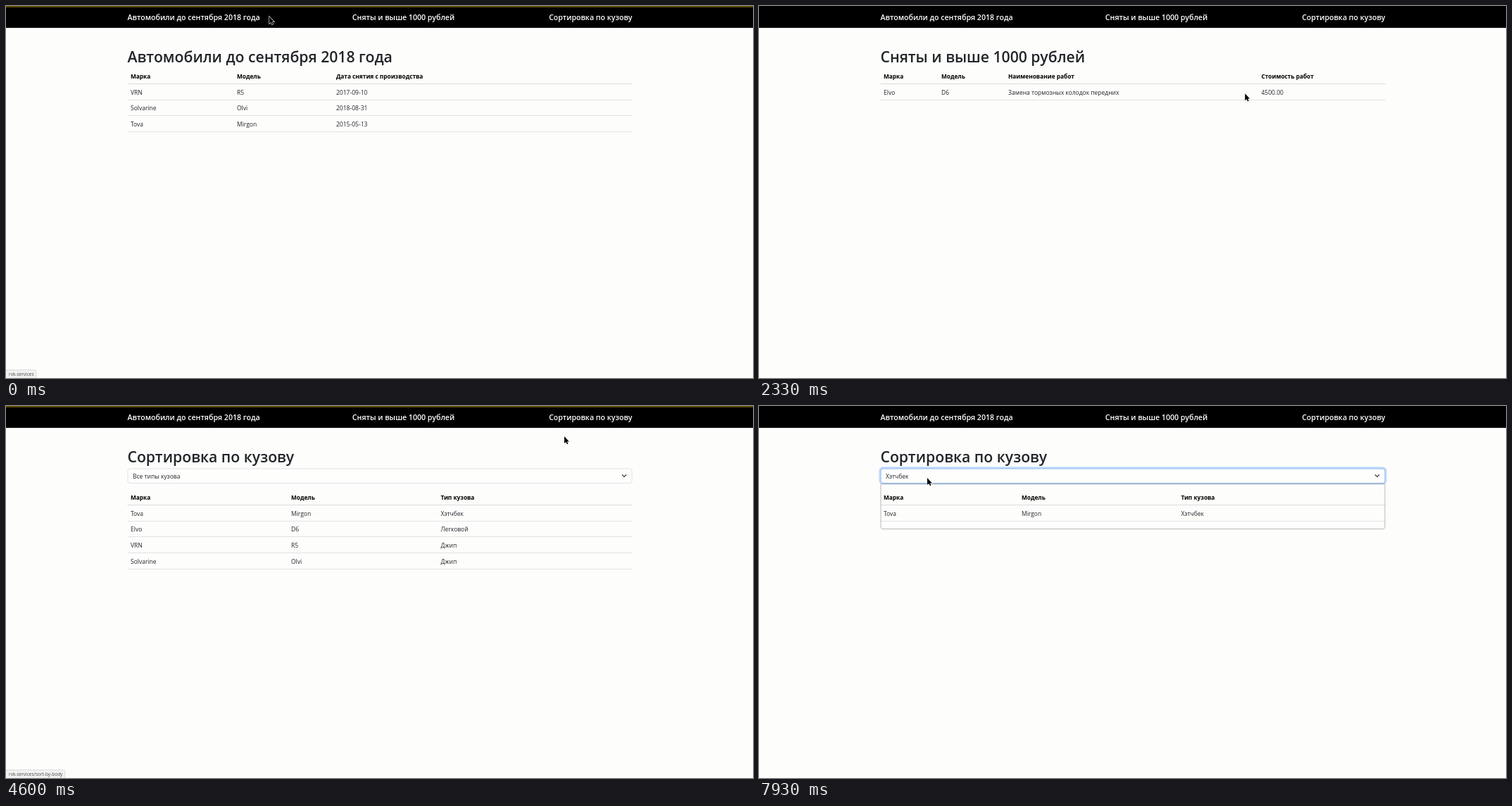
These frames come from a looping animation (1061 px wide and 528 px high, 8000 ms). An HTML page with a canvas:

```html
<!DOCTYPE html>
<html lang="ru">
<head>
<meta charset="utf-8">
<style>
  html, body { margin: 0; width: 100%; height: 100%; overflow: hidden; background: #fdfdfb; }
  canvas { display: block; }
</style>
</head>
<body>
<canvas id="stage" width="1061" height="528"></canvas>
<script>
const LOOP = 8000, LEFT = 172.5, RIGHT = 889.5, ROW = 22.7;
const BG = '#fdfdfb', INK = '#212529', BLUE = '#1b66c9';
const FONT = '"Open Sans", "Noto Sans", sans-serif';
const ctx = document.getElementById('stage').getContext('2d');

const LINKS = [
  ['Автомобили до сентября 2018 года', 172.5, 356],
  ['Сняты и выше 1000 рублей', 494, 635],
  ['Сортировка по кузову', 773, 889.5],
];
const TYPES = ['Все типы кузова', 'Хэтчбек', 'Легковой', 'Джип'];
const SITE = 'rvk-services';

const byDate = {
  title: LINKS[0][0], top: 103, cols: [177, 328, 469],
  rows: [
    ['Марка', 'Модель', 'Дата снятия с производства'],
    ['VRN', 'R5', '2017-09-10'],
    ['Solvarine', 'Olvi', '2018-08-31'],
    ['Tova', 'Mirgon', '2015-05-13'],
  ],
};
const byPrice = {
  title: LINKS[1][0], top: 103, cols: [177, 259, 354, 713.5],
  rows: [
    ['Марка', 'Модель', 'Наименование работ', 'Стоимость работ'],
    ['Elvo', 'D6', 'Замена тормозных колодок передних', '4500.00'],
  ],
};
const byBody = {
  title: LINKS[2][0], top: 133, cols: [177, 405, 617.5], select: TYPES[0],
  rows: [
    ['Марка', 'Модель', 'Тип кузова'],
    ['Tova', 'Mirgon', 'Хэтчбек'],
    ['Elvo', 'D6', 'Легковой'],
    ['VRN', 'R5', 'Джип'],
    ['Solvarine', 'Olvi', 'Джип'],
  ],
};
const hatchbacks = {
  ...byBody, cols: [177, 373, 599.5], select: TYPES[1], rows: byBody.rows.slice(0, 2),
};

// Pointer stops: time, x, y
const PATH = [
  [0, 374, 15], [60, 374, 15], [600, 560, 16], [850, 560, 16], [1440, 377, 127],
  [1700, 377, 127], [2450, 713, 124], [2600, 713, 124], [3000, 788, 124],
  [3370, 788, 124], [4000, 815, 16], [4250, 815, 16], [4600, 793, 43],
  [5080, 239, 102], [5450, 239, 102], [5800, 228, 132], [6200, 228, 132],
  [6700, 239, 102], [LOOP, 239, 102],
];

const during = (t, from, to) => t >= from && t < to;

function pointerAt(t) {
  const i = PATH.findIndex(stop => stop[0] > t);
  const [t0, x0, y0] = PATH[i - 1], [t1, x1, y1] = PATH[i];
  const p = (t - t0) / (t1 - t0), k = p * p * (3 - 2 * p);
  return [x0 + (x1 - x0) * k, y0 + (y1 - y0) * k];
}

function text(str, x, y, size, weight = 400, color = INK, align = 'left') {
  ctx.font = `${weight} ${size}px ${FONT}`;
  ctx.textAlign = align;
  ctx.fillStyle = color;
  ctx.fillText(str, x, y);
}

function rect(x, y, w, h, color) {
  ctx.fillStyle = color;
  ctx.fillRect(x, y, w, h);
}

function box(x, y, w, h, r, stroke, fill, width = 1) {
  ctx.beginPath();
  ctx.roundRect(x, y, w, h, r);
  if (fill) { ctx.fillStyle = fill; ctx.fill(); }
  ctx.strokeStyle = stroke;
  ctx.lineWidth = width;
  ctx.stroke();
}

function drawNav(loading) {
  rect(0, 0, 1061, 31, '#000');
  if (loading) rect(0, 0, 1061, 2, '#5c4b00');
  text(LINKS[0][0], LEFT, 20, 10.6, 600, '#fff');
  text(LINKS[1][0], 564.5, 20, 10.6, 600, '#fff', 'center');
  text(LINKS[2][0], RIGHT, 20, 10.6, 600, '#fff', 'right');
}

function drawTable({ top, cols, rows }) {
  rows.forEach((row, r) => {
    const y = top + r * ROW;
    row.forEach((cell, c) =>
      text(cell, cols[c], y, r ? 8.5 : 8.3, r ? 400 : 700, r ? INK : '#000'));
    rect(LEFT, Math.round(y + 7), RIGHT - LEFT, 1, r ? '#e2e3e7' : '#d9dbdf');
  });
}

function drawSelect(label, focused) {
  if (focused) box(172, 88, 718, 22, 4, '#c4dbfb', null, 3.4);
  box(173, 89, 716, 20.5, 3, focused ? '#8fb9f5' : '#dee2e6', '#fefefd');
  text(label, 180, 102.5, 8.5);
  ctx.beginPath();
  ctx.moveTo(875, 97.5);
  ctx.lineTo(878, 100.5);
  ctx.lineTo(881, 97.5);
  ctx.strokeStyle = '#343a40';
  ctx.lineWidth = 1.2;
  ctx.stroke();
}

function drawOptions(hover) {
  box(173, 110.5, 716, 64, [0, 0, 3, 3], '#b9bab8', '#fefefd');
  rect(173.5, 110 + hover * 16, 715, 16, BLUE);
  TYPES.forEach((type, i) =>
    text(type, 180, 122 + i * 16, 8.5, 400, i === hover ? '#fff' : INK));
}

function drawStatus(url) {
  ctx.font = `400 6.5px ${FONT}`;
  const w = ctx.measureText(url).width + 8;
  box(-2, 516.5, w + 1.5, 14, [0, 2, 0, 0], '#dcdddc', '#f0f1f0');
  text(url, 4, 525, 6.5, 400, '#4a4d50');
}

const SHAPES = {
  arrow: new Path2D('M0 0V10L2.3 8L3.9 11.2L5.4 10.4L3.9 7.4H6.8Z'),
  hand: new Path2D('M0 0Q1 -1 2 0V4L6 5Q7 5.3 7 6.5L6 11H1L-2 7Q-2 5.5 0 6.5Z'),
  beam: new Path2D('M-2 -4H-.6L0 -3.4L.6 -4H2M0 -3.4V3.4M-2 4H-.6L0 3.4L.6 4H2'),
};

function drawPointer(x, y, page) {
  const onLink = y < 24 && LINKS.some(([, a, b]) => x > a && x < b);
  const onText = page === byPrice && y > 116 && y < 130 &&
    (during(x, 354, 509) || during(x, 712, 745));
  ctx.save();
  ctx.translate(x, y);
  if (onText) {
    ctx.strokeStyle = '#222';
    ctx.lineWidth = 0.9;
    ctx.stroke(SHAPES.beam);
  } else {
    const shape = onLink ? SHAPES.hand : SHAPES.arrow;
    ctx.strokeStyle = '#fff';
    ctx.lineWidth = 1.2;
    ctx.stroke(shape);
    ctx.fillStyle = onLink ? '#fff' : '#000';
    ctx.fill(shape);
    if (onLink) {
      ctx.strokeStyle = '#000';
      ctx.lineWidth = 0.6;
      ctx.stroke(shape);
    }
  }
  ctx.restore();
}

function pageAt(t) {
  if (t < 870) return byDate;
  if (t < 4280) return byPrice;
  return t < 5920 ? byBody : hatchbacks;
}

function statusAt(t) {
  if (t < 250) return SITE;
  if (during(t, 480, 1580)) return SITE + '/cars-above-1000';
  if (during(t, 3960, 5060)) return SITE + '/sort-by-body';
}

function draw(t) {
  const page = pageAt(t), [x, y] = pointerAt(t), url = statusAt(t);
  rect(0, 0, 1061, 528, BG);
  drawNav(t < 500 || during(t, 830, 1350) || during(t, 4230, 5060));
  text(page.title, LEFT, 80, 21.2, 600);
  drawTable(page);
  if (page.select) drawSelect(page.select, t >= 5370);

  if (during(t, 2600, 4280)) {
    const w = Math.max(0, Math.min(x - 713.5, 30.5));
    ctx.save();
    ctx.beginPath();
    ctx.rect(713.5, 116, w, 13);
    ctx.clip();
    rect(713, 116, 32, 13, '#2f65c4');
    text('4500.00', 713.5, 103 + ROW, 8.5, 400, '#fff');
    ctx.restore();
  }

  if (during(t, 5370, 5920)) drawOptions(y < 126 ? 0 : 1);
  if (t >= 6800) box(173, 110.5, 716, 64, [0, 0, 3, 3], '#b9bab8');
  if (url) drawStatus(url);
  drawPointer(x, y, page);
}

function tick() {
  draw(performance.now() % LOOP);
  requestAnimationFrame(tick);
}
tick();
</script>
</body>
</html>
```
